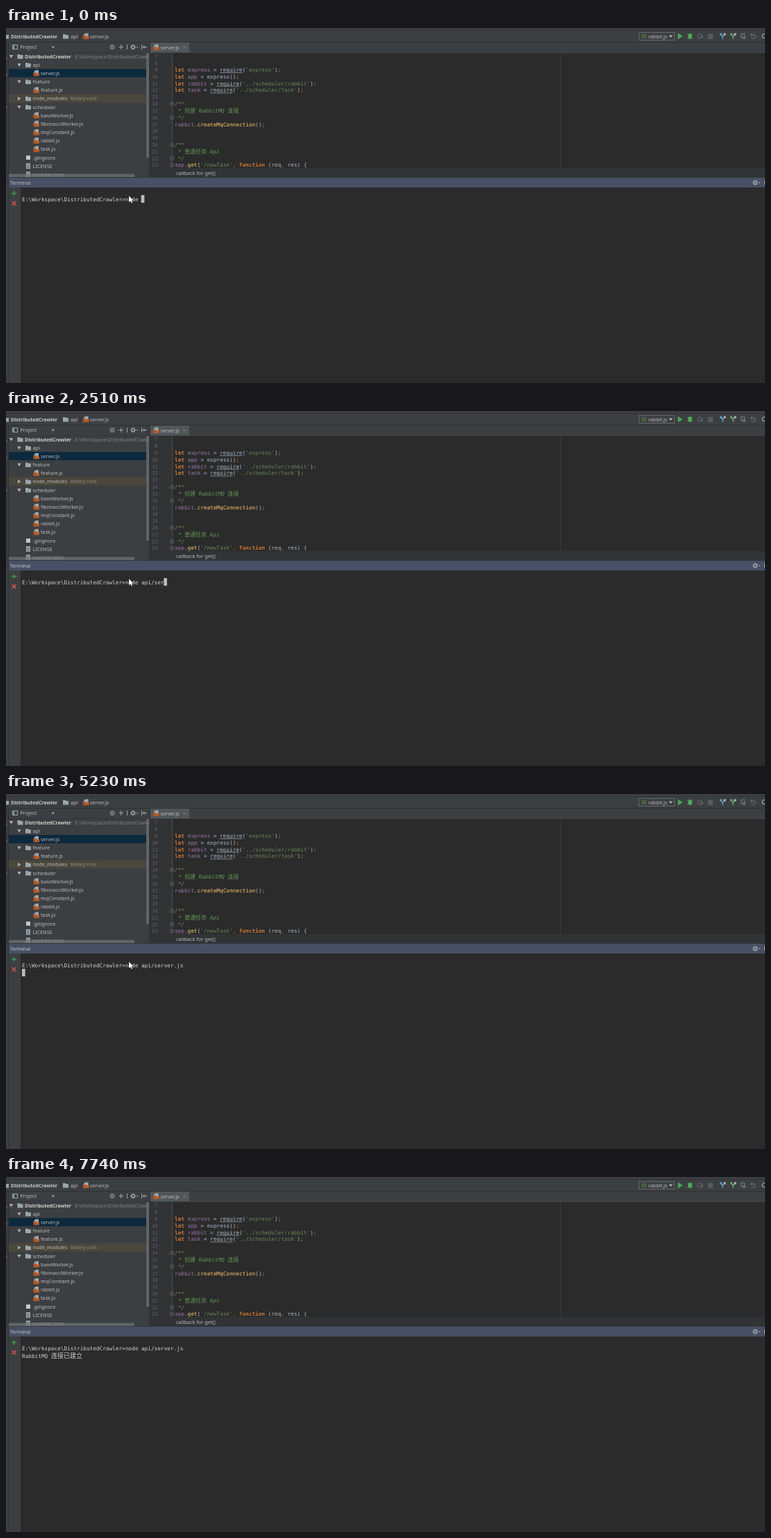
Recreate the animation shown at these times as an HTML page with a canvas. Size 1093 by 512 pixels, loop 8000 ms.

```html
<!DOCTYPE html>
<html lang="en">
<head>
<meta charset="utf-8">
<title>Terminal session</title>
<style>
html, body { margin: 0; width: 100%; height: 100%; overflow: hidden; background: #2b2b2b; }
canvas { display: block; }
</style>
</head>
<body>
<canvas id="stage" width="1093" height="512"></canvas>
<script>
const stage = document.getElementById('stage');
const LOOP = 8000, CELL = 4.65;
const UI = '"Noto Sans", "Noto Sans CJK SC", sans-serif';
const MONO = '"DejaVu Sans Mono", "Noto Sans CJK SC", monospace';
const CJK = '"Noto Sans CJK SC", "Noto Sans CJK", sans-serif';
const GREY = '#a9b7c6', ORANGE = '#cc7832', GREEN = '#6a8759', DOC = '#629755', PURPLE = '#9876aa', GOLD = '#ffc66d';

let g;

function rect(x, y, w, h, color) {
  g.fillStyle = color;
  g.fillRect(x, y, w, h);
}

function poly(color, ...points) {
  g.fillStyle = color;
  g.beginPath();
  for (let i = 0; i < points.length; i += 2) g.lineTo(points[i], points[i + 1]);
  g.fill();
}

function stroke(color, width, ...points) {
  g.strokeStyle = color;
  g.lineWidth = width;
  g.beginPath();
  for (let i = 0; i < points.length; i += 2) g.lineTo(points[i], points[i + 1]);
  g.stroke();
}

function ring(x, y, r, color, width = 1) {
  g.strokeStyle = color;
  g.lineWidth = width;
  g.beginPath();
  g.arc(x, y, r, 0, 7);
  g.stroke();
}

function text(str, x, y, color, font = `7.2px ${UI}`) {
  g.font = font;
  g.fillStyle = color;
  g.fillText(str, x, y);
}

const mono = (str, x, y, color, style = '') => text(str, x, y, color, `${style} 7.725px ${MONO}`);

function folder(x, y, color = '#9aa5ad') {
  rect(x, y - 3, 4, 2, color);
  rect(x, y - 2, 8, 5.5, color);
}

function scriptFile(x, y) {
  poly('#9aa7b0', x + 3, y - 4.5, x + 7.5, y - 4.5, x + 7.5, y + 2, x + 1, y + 2, x + 1, y - 2.5);
  rect(x, y - 1, 5, 5, '#c4642c');
  rect(x + 4.5, y, 4, 4, '#c4642c');
  stroke('#50301f', .8, x + 1, y + 2.5, x + 2.2, y + 2.5, x + 2.2, y);
  stroke('#50301f', .8, x + 5.5, y + 2.5, x + 7.5, y + 2.5);
}

function plainFile(x, y) {
  rect(x + 1, y - 4, 6, 8, '#9aa7b0');
  for (let i = -2; i < 4; i += 2) rect(x + 2, y + i, 4, .7, '#4b5257');
}

function twisty(x, y, open) {
  if (open) poly('#adadad', x - 2.8, y - 2, x + 2.8, y - 2, x, y + 2.5);
  else poly('#adadad', x - 2, y - 2.8, x + 2.5, y, x - 2, y + 2.8);
}

function gear(x, y) {
  ring(x, y, 2.2, '#a0a3a5', 1.5);
  for (let i = 0; i < 8; i++) {
    const c = Math.cos(i * Math.PI / 4), s = Math.sin(i * Math.PI / 4);
    stroke('#a0a3a5', 1, x + c * 2.5, y + s * 2.5, x + c * 4, y + s * 4);
  }
  poly('#a0a3a5', x + 4.5, y - .5, x + 7.5, y - .5, x + 6, y + 1.2);
}

function drawToolbar() {
  rect(0, 0, 1093, 21, '#3c3f41');
  rect(0, 3, 1093, 1, '#323436');
  rect(0, 20, 1093, 1, '#2d2f30');
  folder(-4, 12);
  text('DistributedCrawler', 7, 14.6, '#c8c8c8', `bold 7px ${UI}`);
  folder(82, 12);
  text('api', 93, 14.6, '#bbb');
  scriptFile(111, 12);
  text('server.js', 121, 14.6, '#bbb');
  for (const x of [76, 105]) stroke('#303234', 1, x, 6, x + 3, 12, x, 18);

  g.strokeStyle = '#62676a';
  g.lineWidth = 1;
  g.strokeRect(911.5, 6.5, 51, 11);
  rect(915, 9, 7, 6, '#47613c');
  text('rabbit.js', 925, 14.6, '#bbb');
  poly('#b0b0b0', 954.5, 10.5, 960, 10.5, 957.2, 14);
  poly('#49a65a', 967.5, 7.5, 974.5, 12, 967.5, 16.5);
  stroke('#4b9d53', 1, 981, 9, 989, 15);
  stroke('#4b9d53', 1, 989, 9, 981, 15);
  g.fillStyle = '#4fac59';
  g.beginPath();
  g.ellipse(985, 12, 2.8, 4, 0, 0, 7);
  g.fill();
  ring(999, 12, 3, '#585b5d', 1.5);
  rect(1000, 11, 4, 4, '#585b5d');
  rect(1010.5, 8.5, 7.5, 7.5, '#575a5c');
  for (const [x, tip] of [[1032, '#4a9fd0'], [1047, '#5aad55']]) {
    stroke('#a3a8ab', 1.3, x - 3, 9, x, 12, x + 3, 9);
    stroke(tip, 1.5, x, 11, x, 16);
    rect(x - 4, 7.5, 3, 3, tip);
    rect(x + 1.5, 7.5, 3, 3, '#b5b8ba');
  }
  g.strokeStyle = '#686b6d';
  g.strokeRect(1058.5, 8.5, 5, 5);
  rect(1061, 12, 4, 4, '#686b6d');
  stroke('#686b6d', 1.2, 1075, 8, 1072.5, 10, 1075, 12);
  stroke('#686b6d', 1.2, 1072.5, 10, 1078, 10, 1079.5, 12, 1078, 15, 1073, 15);
  ring(1092, 11.5, 3, '#a5a8aa', 1.2);
}

const tree = [
  ['DistributedCrawler', 0, 'open'],
  ['api', 1, 'open'], ['server.js', 2, 'js'],
  ['feature', 1, 'open'], ['feature.js', 2, 'js'],
  ['node_modules', 1, 'closed'],
  ['scheduler', 1, 'open'],
  ...['baseWorker', 'fibonacciWorker', 'mqConstant', 'rabbit', 'task'].map(n => [n + '.js', 2, 'js']),
  ['.gitignore', 1, 'vcs'], ['LICENSE', 1, 'file'], ['package.json', 1, 'json']
];

function drawProject() {
  rect(0, 21, 207, 195, '#3c3f41');
  rect(0, 21, 3, 195, '#393c3e');
  rect(3, 21, 1, 195, '#2d3031');
  for (const y of [42, 66, 113]) rect(0, y, 1.3, 3, '#86605c');
  rect(4, 35, 203, 1, '#333638');
  g.strokeStyle = '#9aa7b0';
  g.lineWidth = 1;
  g.strokeRect(9.5, 24.5, 7, 6);
  rect(9, 24, 3, 7, '#7f99a8');
  text('Project', 20.5, 30.4, '#bbb');
  poly('#a0a3a5', 65.5, 26.5, 70, 26.5, 67.7, 29.5);
  ring(153, 27.5, 3, '#a0a3a5');
  stroke('#a0a3a5', .9, 151.5, 26, 154.5, 29);
  stroke('#a0a3a5', .9, 154.5, 26, 151.5, 29);
  stroke('#a0a3a5', 1, 162.5, 27.5, 169, 27.5);
  stroke('#a0a3a5', 1, 165.7, 24, 165.7, 31);
  rect(174, 24, 1, 7, '#a0a3a5');
  gear(183, 27.5);
  rect(195, 24, 1, 7, '#a0a3a5');
  stroke('#a0a3a5', 1, 203, 27.5, 197, 27.5);
  poly('#a0a3a5', 196.5, 27.5, 199.5, 25.2, 199.5, 29.8);

  g.save();
  g.beginPath();
  g.rect(4, 36, 203, 180);
  g.clip();
  rect(4, 59, 198, 12, '#0d293e');
  rect(4, 95.5, 198, 12, '#4b473c');
  tree.forEach(([name, depth, kind], i) => {
    const y = 41 + i * 12.16, x = 16.5 + depth * 11.5, base = y + 2.6;
    if (kind === 'open' || kind === 'closed') {
      twisty(x - 9, y, kind === 'open');
      folder(x, y);
    } else if (kind === 'js') scriptFile(x, y);
    else if (kind === 'vcs') rect(x + 1, y - 3, 6, 6, '#c5c8ca');
    else plainFile(x, y);
    if (kind === 'json') rect(x, y, 4, 4, '#5d9fb8');
    text(name, x + 10.5, base, depth ? '#bbb' : '#cfcfcf', depth ? undefined : `bold 7px ${UI}`);
  });
  text('E:\\Workspace\\DistributedCrawler', 99, 43.6, '#808284');
  text('library root', 93, 104.4, '#92907f');
  rect(202, 36, 4, 151, 'rgba(110,113,115,.75)');
  rect(4, 210.5, 181, 4.5, 'rgba(115,118,120,.7)');
  g.restore();
  rect(206, 21, 1, 195, '#2f3233');
}

const required = (name, path) => [
  ['let ', ORANGE, 'bold'], [name, PURPLE], [' = ', GREY], ['require', GREY, 'underline'],
  ['(', GREY], [`'${path}'`, GREEN], [')', GREY], [';', ORANGE]
];
const doc = str => [[str, DOC, 'italic']];
const code = {
  9: required('express', 'express'),
  10: [['let ', ORANGE, 'bold'], ['app', PURPLE], [' = ', GREY], ['express', GREY], ['()', GREY], [';', ORANGE]],
  11: required('rabbit', '../scheduler/rabbit'),
  12: required('task', '../scheduler/task'),
  14: doc('/**'),
  15: [...doc(' * '), ['创建', DOC, 'cjk'], ...doc(' RabbitMQ '), ['连接', DOC, 'cjk']],
  16: doc(' */'),
  17: [['rabbit', PURPLE], ['.', GREY], ['createMqConnection', GOLD], ['()', GREY], [';', ORANGE]],
  20: doc('/**'),
  21: [...doc(' * '), ['普通任务', DOC, 'cjk'], ...doc(' Api')],
  22: doc(' */'),
  23: [['app', PURPLE], ['.', GREY], ['get', GOLD], ['(', GREY], ["'/newTask'", GREEN], [', ', ORANGE],
    ['function ', ORANGE, 'bold'], ['(req', GREY], [', ', ORANGE], ['res) {', GREY]]
};

function drawEditor() {
  rect(207, 21, 886, 15, '#3c3f41');
  rect(208, 21, 56, 14, '#515658');
  scriptFile(212, 28);
  text('server.js', 222.5, 30.6, '#bbb');
  stroke('#7c7f81', .8, 255, 26, 259, 30);
  stroke('#7c7f81', .8, 259, 26, 255, 30);
  rect(207, 35, 886, 1, '#434749');
  rect(207, 36, 886, 166, '#2b2b2b');
  rect(207, 36, 33, 166, '#313335');
  rect(239, 36, 1, 166, '#494c4e');
  rect(798, 36, 1, 166, '#3b3b3b');

  for (let n = 7; n <= 23; n++) {
    const y = 43.4 + (n - 7) * 9.81;
    g.textAlign = 'right';
    text(n, 218.5, y, '#606366', `7px ${MONO}`);
    g.textAlign = 'left';
    let x = 243;
    for (const [str, color, style] of code[n] || []) {
      if (style === 'cjk') {
        text(str, x, y, color, `8px ${CJK}`);
        x += str.length * 8;
        continue;
      }
      mono(str, x, y, color, style === 'underline' ? '' : style);
      const w = str.length * 4.64;
      if (style === 'underline') rect(x, y + 1, w, .8, '#929da9');
      x += w;
    }
    if ([14, 16, 20, 22, 23].includes(n)) {
      rect(236.5, y - 5, 5, 5, '#313335');
      g.strokeStyle = '#606366';
      g.lineWidth = .8;
      g.strokeRect(236.8, y - 4.7, 4.4, 4.4);
      rect(237.8, y - 2.9, 2.4, .8, '#707376');
    }
  }
  rect(207, 202, 886, 14, '#313335');
  text('callback for get()', 245, 212, '#bbb', `7.3px ${UI}`);
}

function drawTerminalFrame() {
  rect(0, 216, 1093, 14, '#475064');
  rect(0, 215, 1093, 1, '#323538');
  rect(0, 216, 4, 296, '#3c3f41');
  text('Terminal', 6, 225.6, '#c0c2c5');
  gear(1079, 223);
  rect(1092, 220, 1, 6, '#a0a3a5');
  rect(0, 230, 21, 282, '#3c3f41');
  rect(3, 216, 1, 296, '#313436');
  rect(21, 230, 1072, 282, '#2b2b2b');
  stroke('#3f9f4c', 1.3, 8, 238.5, 15, 238.5);
  stroke('#3f9f4c', 1.3, 11.5, 235, 11.5, 242);
  stroke('#c75450', 1.7, 8.7, 250, 14.3, 256);
  stroke('#c75450', 1.7, 14.3, 250, 8.7, 256);
}

const backdrop = document.createElement('canvas');
backdrop.width = stage.width;
backdrop.height = stage.height;
g = backdrop.getContext('2d');
drawToolbar();
drawProject();
drawEditor();
drawTerminalFrame();
g = stage.getContext('2d');

const prompt = 'E:\\Workspace\\DistributedCrawler>node ';
const typed = 'api/server.js';
const keyTimes = [400, 710, 1020, 1830, 2140, 2390, 2510, 2940, 3220, 3370, 3680, 4520, 4670];
const ENTER = 5230, REPLY = 5790;
const caretOff = [[1550, 1830], [6760, 7180], [7740, LOOP]];
const pointerStops = [[6760, 177, 242], [7030, 202, 263], [7300, 154, 422]];

function drawPointer(x, y) {
  const shape = [x, y, x, y + 9.3, x + 2.2, y + 7.3, x + 3.6, y + 10.5, x + 5, y + 9.9, x + 3.7, y + 6.8, x + 6.5, y + 6.6];
  stroke('#111', 1, ...shape, x, y);
  poly('#fff', ...shape);
}

function draw(t) {
  g.drawImage(backdrop, 0, 0);
  const line = prompt + typed.slice(0, keyTimes.filter(k => t >= k).length);
  mono(line, 23, 250, '#d0d0d0');
  if (t >= REPLY) {
    mono('RabbitMQ ', 23, 261, '#d0d0d0');
    text('连接已建立', 64.9, 261.3, '#d0d0d0', `9px ${CJK}`);
  }
  if (!caretOff.some(([from, to]) => t >= from && t < to)) {
    const col = t < ENTER ? line.length : 0;
    const row = t < ENTER ? 0 : t < REPLY ? 1 : 2;
    rect(23 + col * CELL - (col ? .4 : 0), 241 + row * 11, CELL, 11, '#bbb');
  }
  const stop = pointerStops.find(([until]) => t < until);
  if (stop) drawPointer(stop[1], stop[2]);
}

const start = performance.now();
function tick() {
  draw((performance.now() - start) % LOOP);
  requestAnimationFrame(tick);
}
tick();
</script>
</body>
</html>
```
